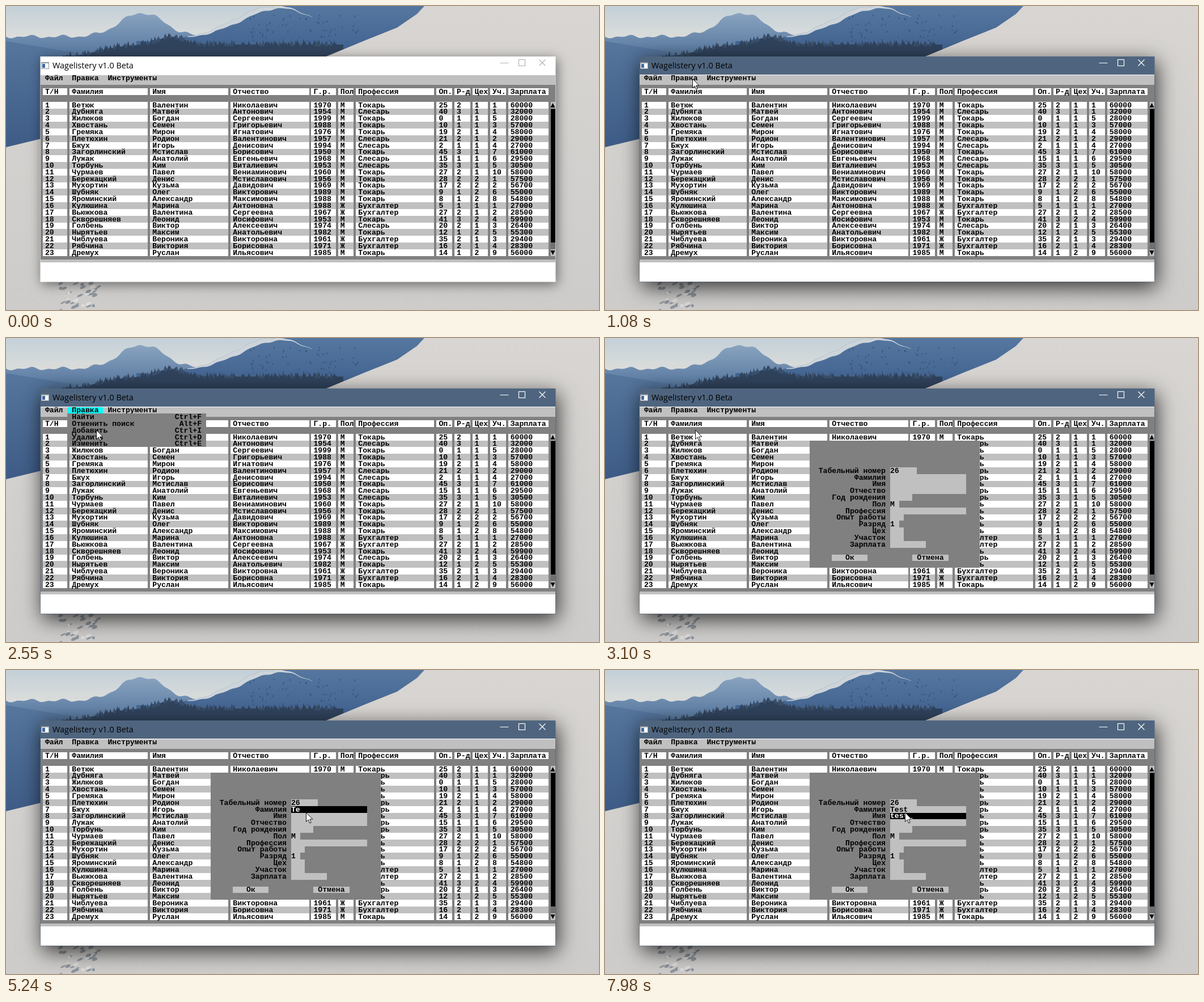
Animation of 1046 by 536 pixels, one loop 8 s. Source, as an HTML page with a canvas:

```html
<!DOCTYPE html>
<html lang="ru">
<head>
<meta charset="utf-8">
<style>
html, body { margin: 0; width: 100%; height: 100%; overflow: hidden; }
canvas { display: block; }
</style>
</head>
<body>
<canvas id="stage" width="1046" height="536"></canvas>
<script>
const W = 1046, H = 536, LOOP = 8000;
const LEFT = 61, TOP = 121.5, CW = 7.892, CH = 11.82;   // text grid
const DARK = '#808080', LIGHT = '#c0c0c0';
const stage = document.getElementById('stage').getContext('2d');
let g = stage;

const HEADERS = ['Т/Н', 'Фамилия', 'Имя', 'Отчество', 'Г.р.', 'Пол', 'Профессия', 'Оп.', 'Р-д', 'Цех', 'Уч.', 'Зарплата'];
const EDGES = [0, 6, 24, 42, 60, 66, 70, 88, 92, 96, 100, 104, 113];
const JOBS = { Т: 'Токарь', С: 'Слесарь', Б: 'Бухгалтер' };

// name, birth year, job, experience, section, salary
const PEOPLE = `Ветюк Валентин Николаевич 1970 Т 25 1 60000
Дубняга Матвей Антонович 1954 С 40 1 32000
Жилюков Богдан Сергеевич 1999 Т 0 5 28000
Хвостань Семен Григорьевич 1988 Т 10 3 57000
Гремяка Мирон Игнатович 1976 Т 19 4 58000
Плетюхин Родион Валентинович 1957 С 21 2 29000
Бжух Игорь Денисович 1994 С 2 4 27000
Загорлинский Мстислав Борисович 1950 Т 45 7 61000
Лужак Анатолий Евгеньевич 1968 С 15 6 29500
Торбунь Ким Виталиевич 1953 С 35 5 30500
Чурмаев Павел Вениаминович 1960 Т 27 10 58000
Бережацкий Денис Мстиславович 1956 Т 28 1 57500
Мухортин Кузьма Давидович 1969 Т 17 2 56700
Шубняк Олег Викторович 1989 Т 9 6 55000
Яроминский Александр Максимович 1988 Т 8 8 54800
Кулюшина Марина Антоновна 1988 Б 5 1 27000
Вьюжкова Валентина Сергеевна 1967 Б 27 2 28500
Скворешняев Леонид Иосифович 1953 Т 41 4 59900
Голбень Виктор Алексеевич 1974 С 20 3 26400
Нырятьев Максим Анатольевич 1982 Т 12 5 55300
Чиблуева Вероника Викторовна 1961 Б 35 3 29400
Рябчина Виктория Борисовна 1971 Б 16 4 28300
Дремух Руслан Ильясович 1985 Т 14 9 56000`.split('\n').map((line, i) => {
  const [last, first, middle, year, job, years, section, salary] = line.split(' ');
  const grade = years < 16 ? 1 : years < 30 || job === 'Б' ? 2 : 3;
  const shop = i > 10 && job === 'Т' ? 2 : 1;
  return [i + 1, last, first, middle, year, job === 'Б' ? 'Ж' : 'М', JOBS[job], years, grade, shop, section, salary];
});

const MENU = [['Найти', 'Ctrl+F'], ['Отменить поиск', 'Alt+F'], ['Добавить', 'Ctrl+I'], ['Удалить', 'Ctrl+D'], ['Изменить', 'Ctrl+E']];
const FIELDS = [['Табельный номер', 6, '26'], ['Фамилия', 17], ['Имя', 17], ['Отчество', 17], ['Год рождения', 5],
  ['Пол', 2, 'М'], ['Профессия', 17], ['Опыт работы', 3], ['Разряд', 2, '1'], ['Цех', 3], ['Участок', 3], ['Зарплата', 8]];

const ACTIVATE = 1080, MENU_OPEN = 1780, DIALOG_OPEN = 3100, FOCUS = 4170, BLINK = 535;
const KEYS = [[4860, 'T'], [5170, 'e'], [5640, 's'], [6420, 'Back'], [6490, 's'], [6660, 't'],
  [6810, 'Tab'], [7130, 't'], [7510, 'e'], [7830, 's'], [7980, 't']];

// pointer: start, step count, step length, from, to, vertical bow
const MOVES = [[170, 10, 75, [759, 442], [154, 128], -90],
  [2160, 5, 78, [154, 128], [159, 162], 0],
  [3390, 9, 78, [159, 162], [529, 251], 45]];

function rect(x, y, w, h, color) {
  g.fillStyle = color;
  g.fillRect(x, y, w, h);
}
function cells(col, row, cols, rows, color) {
  const x = Math.round(LEFT + col * CW), y = Math.round(TOP + row * CH);
  rect(x, y, Math.round(LEFT + (col + cols) * CW) - x, Math.round(TOP + (row + rows) * CH) - y, color);
}
function write(str, col, row, color = '#000') {
  g.font = 'bold 13.15px "Liberation Mono", monospace';
  g.fillStyle = color;
  g.fillText(str, LEFT + col * CW, TOP + row * CH + 9.8);
}
function poly(color, points) {
  g.fillStyle = color;
  g.beginPath();
  for (const [x, y] of points) g.lineTo(x, y);
  g.closePath();
  g.fill();
}
function gradient(y0, y1, a, b) {
  const fill = g.createLinearGradient(0, y0, 0, y1);
  fill.addColorStop(0, a);
  fill.addColorStop(1, b);
  return fill;
}
// fills the band between two curves
function land(color, x0, x1, top, bottom) {
  const upper = [], lower = [];
  for (let x = x0; x <= x1; x += 5) {
    upper.push([x, top(x)]);
    lower.unshift([x, bottom(x)]);
  }
  poly(color, upper.concat(lower));
}

function drawLandscape() {
  let seed = 77;
  const rnd = () => (seed = seed * 16807 % 2147483647) / 2147483647;
  const bump = (x, center, width) => Math.exp(-(((x - center) / width) ** 2));
  const rough = x => 2 * Math.sin(x / 9) + 1.5 * Math.sin(x / 4.3);
  const far = x => 54 - 42 * bump(x, 240, 55) + rough(x);
  const near = x => 62 - 62 * bump(x, 475, 105) + rough(x) / 2;
  const forest = x => 68 + 20 * bump(x, 110, 70) - 14 * bump(x, 290, 30);
  const base = () => 100;

  rect(0, 0, W, 260, gradient(0, 60, '#c3d0d8', '#dddedb'));
  land(gradient(5, 90, '#8ea7c2', '#55779f'), 0, 400, far, base);
  land(gradient(55, 250, '#57779e', '#3d5b86'), 0, 120, x => 62 + x / 6, () => 260);
  land(gradient(0, 90, '#55779f', '#3f608f'), 230, 600, near, base);
  rect(475, 0, 265, 90, gradient(0, 90, '#55779f', '#3f608f'));
  land('#cdd4da', 320, 540, near, x => near(x) + 9 * bump(x, 420, 70));
  for (let i = 0; i < 60; i++) rect(430 + rnd() * 190, 15 + rnd() * 45, 1.5, 3, '#36527b');
  land('#30435c', 100, 595, forest, base);
  for (let i = 0; i < 170; i++) {
    const x = 105 + rnd() * 480, y = forest(x) + 3, h = 5 + rnd() * 7;
    poly(rnd() < .5 ? '#30435c' : '#3a506d', [[x, y - h], [x + 3, y], [x - 3, y]]);
  }

  const snow = gradient(0, H, '#d8d5d2', '#cdccca');
  poly(snow, [[560, 91], [630, 62], [690, 38], [725, 14], [738, 0], [W, 0], [W, H], [560, H]]);
  poly(snow, [[0, 249], [62, 234], [W, 234], [W, H], [0, H]]);
  for (let i = 0; i < 400; i++) rect(rnd() * W, 487 + rnd() * 49, 1.5, 1, rnd() < .5 ? '#d8d7d5' : '#c4c3c3');
  for (let i = 0; i < 35; i++) {
    g.fillStyle = rnd() < .6 ? '#8d949d' : '#dddcda';
    g.beginPath();
    g.ellipse(95 + rnd() * 70, 488 + rnd() * 48, 2 + rnd() * 4, 1 + rnd() * 2, -.4, 0, 7);
    g.fill();
  }
}

function drawFrame(active) {
  g.save();
  g.shadowColor = active ? 'rgba(0,0,0,.75)' : 'rgba(0,0,0,.5)';
  g.shadowBlur = active ? 34 : 20;
  g.shadowOffsetX = active ? 3 : 2;
  g.shadowOffsetY = active ? 9 : 4;
  rect(60.5, 89, 909, 397.5, active ? '#4f657f' : '#fff');
  g.restore();
  rect(61, 121, 908, 365, '#fff');
  rect(62, 99, 14, 12, '#8d949c');
  rect(63, 101, 12, 9, '#fff');
  rect(64, 102, 5, 7, '#3f6ba0');
  g.font = '14.4px "Open Sans", sans-serif';
  g.fillStyle = '#000';
  g.fillText('Wagelistery v1.0 Beta', 82, 110);
  g.strokeStyle = active ? '#fff' : '#b4b4b4';
  g.lineWidth = 1.2;
  g.strokeRect(904.5, 94.5, 11, 11);
  g.stroke(new Path2D('M871.5 100.5h15M940.5 94.5l11 11m0-11l-11 11'));
}

function drawTable() {
  cells(0, 0, 115, 1.5, LIGHT);
  cells(0, 1.5, 115, 26, DARK);
  cells(0, 27.5, 115, .5, LIGHT);
  write('Файл', 1, 0);
  write('Правка', 7, 0);
  write('Инструменты', 15, 0);
  [HEADERS, ...PEOPLE].forEach((line, i) => {
    const row = i ? i + 3 : 2;
    line.forEach((str, c) => {
      const start = EDGES[c] + .5, end = c === 11 ? 113.5 : EDGES[c + 1];
      cells(start, row, end - start, 1, i && i % 2 === 0 ? LIGHT : '#fff');
      write(str, EDGES[c] + 1, row);
    });
  });
  cells(114, 4, 1, 23, LIGHT);
  cells(114, 5, 1, 20, '#000');
  cells(114, 25, 1, 1, '#707070');
  for (const [tip, back] of [[171, 179], [439, 431]]) poly('#000', [[964.5, tip], [968.5, back], [960.5, back]]);
}

function drawMenu() {
  cells(6, 0, 8, 1, '#0ff');
  write('Правка', 7, 0);
  cells(6, 1, 31, 5, DARK);
  MENU.forEach(([label, keys], i) => {
    write(label, 7, i + 1);
    write(keys, 36 - keys.length, i + 1);
  });
}

function typedState(t) {
  const state = { texts: ['', '', ''], field: t < FOCUS ? -1 : 1 };
  let last = FOCUS;
  for (const [time, key] of KEYS) {
    if (time > t) break;
    const { texts, field } = state;
    if (key === 'Tab') state.field++;
    else texts[field] = key === 'Back' ? texts[field].slice(0, -1) : texts[field] + key;
    last = time;
  }
  // every key shows the caret, every tick of the blink clock toggles it
  const ticks = time => Math.floor((time - FOCUS) / BLINK);
  state.caret = (ticks(t) - ticks(last)) % 2 === 0;
  return state;
}

function drawDialog(t) {
  const { texts, field, caret } = typedState(t);
  cells(38, 5, 38, 19, DARK);
  FIELDS.forEach(([label, width, value], i) => {
    const row = 9 + i, on = i === field, str = value || texts[i] || '';
    write(label, 55 - label.length, row);
    cells(56, row, width, 1, on ? '#000' : LIGHT);
    write(str, 56, row, on ? '#fff' : '#000');
    if (on && caret) cells(56 + str.length, row + .8, 1, .2, '#fff');
  });
  cells(43, 22, 8, 1, LIGHT);
  write('Ок', 46, 22);
  cells(61, 22, 8, 1, LIGHT);
  write('Отмена', 62, 22);
}

function drawPointer(t) {
  const move = MOVES.findLast(m => m[0] <= t);
  if (!move) return;
  const [start, count, step, from, to, bow] = move;
  const k = Math.min(1, Math.floor((t - start) / step) / count);
  const p = k * k * (3 - 2 * k);
  const arrow = new Path2D('M.5 .5v16l3.7-3.5 2.6 6 2.4-1-2.5-5.8 5.1-.2z');
  g.save();
  g.translate(from[0] + (to[0] - from[0]) * p, from[1] + (to[1] - from[1]) * p + bow * Math.sin(Math.PI * p));
  g.fillStyle = '#fff';
  g.strokeStyle = '#000';
  g.lineWidth = .9;
  g.fill(arrow);
  g.stroke(arrow);
  g.restore();
}

function prerender(active) {
  const layer = document.createElement('canvas');
  layer.width = W;
  layer.height = H;
  g = layer.getContext('2d');
  drawLandscape();
  drawFrame(active);
  drawTable();
  g = stage;
  return layer;
}
const inactiveScene = prerender(false), activeScene = prerender(true);

function render() {
  const t = performance.now() % LOOP;
  g.drawImage(t < ACTIVATE ? inactiveScene : activeScene, 0, 0);
  if (t >= DIALOG_OPEN) drawDialog(t);
  else if (t >= MENU_OPEN) drawMenu();
  drawPointer(t);
  requestAnimationFrame(render);
}
render();
</script>
</body>
</html>
```
